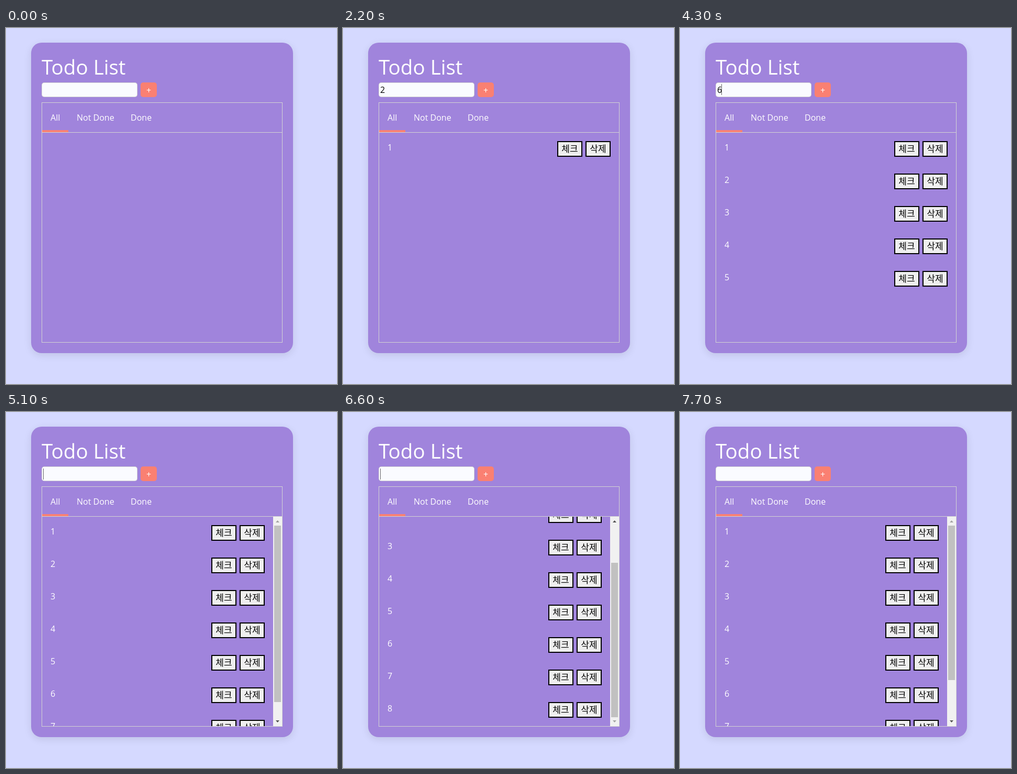
These frames come from a looping animation (632 px wide and 680 px high, 8200 ms). An HTML page with a canvas:

```html
<!DOCTYPE html>
<html lang="ko">
<head>
<meta charset="utf-8">
<title>Todo List</title>
<style>
  html, body { margin: 0; width: 100%; height: 100%; overflow: hidden; background: #d5d9ff; }
  canvas { display: block; }
</style>
</head>
<body>
<canvas id="stage" width="632" height="680"></canvas>
<script>
const ctx = document.getElementById('stage').getContext('2d');
const LOOP = 8200;
const LATIN = '"Open Sans", "Noto Sans", sans-serif';
const HANGUL = '"Noto Sans CJK KR", "Noto Sans CJK", sans-serif';
const SALMON = '#fa8072', LINE = '#d3d3d3', CARD = '#a084dc';

// Times (ms) at which each number is typed and then added to the list.
const typedAt = [1000, 1700, 2600, 3100, 3900, 4300, 4800, 5300];
const addedAt = [1500, 2300, 2900, 3600, 4200, 4600, 5100, 5700];
const caretOn = [[400, 900], [1000, 1400], [1700, 2200], [2600, 3600],
                 [3900, 5800], [6300, 6800], [7300, 7700]];
const scrollSteps = [[0, 0], [6400, 14], [6500, 71], [6600, 96], [6800, 53], [6900, 0]];

const list = { x: 69, y: 200, right: 527, height: 400, row: 62, bar: 17 };

function stateAt(t) {
  const past = times => times.filter(time => time <= t).length;
  const count = past(addedAt), typed = past(typedAt);
  return {
    count,
    text: typed > count ? String(typed) : '',
    caret: caretOn.some(([from, to]) => t >= from && t < to),
    scroll: scrollSteps.filter(([time]) => time <= t).pop()[1]
  };
}

function rect(x, y, w, h, color) {
  ctx.fillStyle = color;
  ctx.fillRect(x, y, w, h);
}

function rounded(x, y, w, h, r, color) {
  ctx.beginPath();
  ctx.roundRect(x, y, w, h, r);
  ctx.fillStyle = color;
  ctx.fill();
}

function text(str, x, y, size = 16, color = '#fff', align = 'left', family = LATIN) {
  ctx.font = `${size}px ${family}`;
  ctx.textAlign = align;
  ctx.fillStyle = color;
  ctx.fillText(str, x, y);
}

function drawCard() {
  rect(0, 0, 632, 680, '#d5d9ff');
  ctx.save();
  ctx.shadowColor = 'rgba(0, 0, 0, 0.1)';
  ctx.shadowBlur = 15;
  ctx.shadowOffsetY = 4;
  rounded(48, 28, 500, 593, 20, CARD);
  ctx.restore();

  text('Todo List', 68, 89, 38.5);
  rounded(257, 104, 31, 28, 5, SALMON);
  text('+', 272.5, 125, 16, '#fff', 'center');

  ctx.lineWidth = 1;
  ctx.strokeStyle = LINE;
  ctx.strokeRect(68.5, 142.5, 459, 458);
  text('All', 85, 177);
  text('Not Done', 135, 177);
  text('Done', 238, 177);
  rect(69, 199, 458, 1, LINE);
  rect(69, 195, 50, 4, SALMON);
}

function drawInput({ text: value, caret }) {
  rounded(68, 104, 183, 28, 5, LINE);
  rounded(69, 105, 181, 26, 4, '#fafbff');
  text(value, 71, 124, 16, '#000');
  if (caret) rect(value ? 79 : 71, value ? 107 : 108, 1, 21, '#666');
}

function drawButton(label, x, y) {
  rect(x, y, 48, 30, '#000');
  rect(x + 2, y + 2, 44, 26, '#efefef');
  text(label, x + 24, y + 21, 17, '#000', 'center', HANGUL);
}

function drawArrow(baseY, tipY, enabled) {
  ctx.beginPath();
  ctx.moveTo(515, baseY);
  ctx.lineTo(522, baseY);
  ctx.lineTo(518.5, tipY);
  ctx.fillStyle = enabled ? '#505050' : '#a3a3a3';
  ctx.fill();
}

function drawScrollbar(content, scroll) {
  const track = list.height - 2 * list.bar;
  const thumb = Math.round(track * list.height / content);
  const range = content - list.height;
  const offset = Math.round((track - thumb) * scroll / range);
  rect(510, list.y, list.bar, list.height, '#f1f1f1');
  rect(512, list.y + list.bar + offset, 13, thumb, '#c1c1c1');
  drawArrow(211, 207, scroll > 0);
  drawArrow(589, 593, scroll < range);
}

function drawList({ count, scroll }) {
  const content = count * list.row;
  const overflows = content > list.height;
  const right = list.right - (overflows ? list.bar : 0);
  ctx.save();
  ctx.beginPath();
  ctx.rect(list.x, list.y, list.right - list.x, list.height);
  ctx.clip();
  for (let i = 0; i < count; i++) {
    const y = list.y + 16 + i * list.row - scroll;
    text(String(i + 1), 85, y + 18);
    drawButton('체크', right - 118, y);
    drawButton('삭제', right - 64, y);
  }
  if (overflows) drawScrollbar(content, scroll);
  ctx.restore();
}

function frame() {
  const state = stateAt(performance.now() % LOOP);
  drawCard();
  drawInput(state);
  drawList(state);
  requestAnimationFrame(frame);
}
frame();
</script>
</body>
</html>
```
